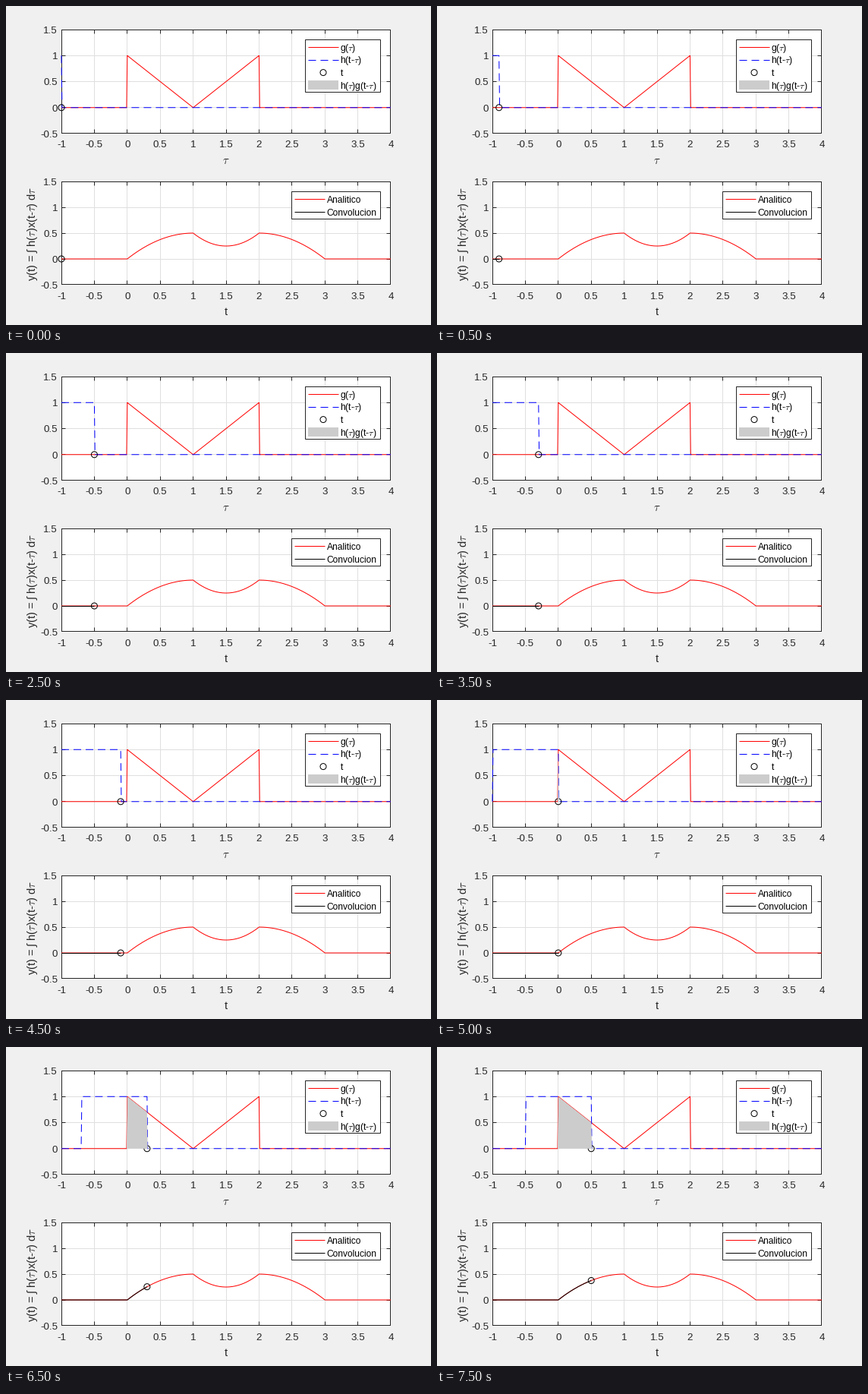
A matplotlib script for the animation above (8000 ms loop, 560x420 px).

```python
import numpy as np
import matplotlib.pyplot as plt
from matplotlib.animation import FuncAnimation
from matplotlib.patches import Circle, Rectangle

W, H = 560, 420
FRAMES, INTERVAL = 16, 500
INK, GRID, SHADE = "#262626", "#dfdfdf", "#cccccc"

# At 72 dpi one point equals one pixel.
plt.rcParams.update({
    "font.family": "Liberation Sans",
    "mathtext.fontset": "cm",
    "lines.linewidth": 1,
    "lines.solid_capstyle": "butt",
    "path.simplify": False,
    "toolbar": "None",
})

fig = plt.figure(figsize=(W / 72, H / 72), dpi=72, facecolor="#f0f0f0")
page = fig.add_axes([0, 0, 1, 1])
page.set(xlim=(0, W), ylim=(H, 0))
page.axis("off")

RED, BLACK = dict(color="red"), dict(color="black")
DASH = dict(color="blue", dashes=(10, 6), dash_capstyle="butt")


def step(x):
    return (x > -1e-9).astype(float)


def g(x):
    return np.abs(1 - x) * (step(x) - step(x - 2.005))


def h(x):
    return step(x) - step(x - 1)


def response(t):
    return np.select(
        [t <= 0, t <= 1, t <= 2, t <= 3],
        [0 * t, t - t**2 / 2, ((2 - t)**2 + (t - 1)**2) / 2, 0.5 - (t - 2)**2 / 2],
        0)


def label(x, y, text, size, color=INK, **kw):
    page.text(x, y, text, size=size, color=color, **kw)


def ring(x, y, z=4):
    return page.add_patch(Circle((x, y), 4, fc="none", ec="black", lw=1, zorder=z))


class Plot:
    """Plot area spanning -1..4 by -0.5..1.5 inside a pixel box."""

    left, right = 73, 507

    def __init__(self, top, bottom):
        self.top, self.bottom = top, bottom
        self.frame()

    def xy(self, x, y):
        return (self.left + (x + 1) / 5 * (self.right - self.left),
                self.bottom - (y + 0.5) / 2 * (self.bottom - self.top))

    def frame(self):
        l, r, t, b = self.left, self.right - 1, self.top, self.bottom - 1
        box = (l, t), r - l, b - t
        page.add_patch(Rectangle(*box, fc="white", ec="none", zorder=0))
        page.add_patch(Rectangle(*box, fc="none", ec=INK, lw=1, zorder=1.5))
        for v in np.arange(-1, 4.1, 0.5):
            x = self.xy(v, 0)[0]
            self.rule([min(int(x + 1e-6), r)] * 2, [t, b], (0, 5))
            label(x, b + 19.5, f"{v:g}", 13.33, ha="center")
        for v in np.arange(-0.5, 1.6, 0.5):
            y = self.xy(0, v)[1]
            self.rule([l, r], [min(int(y + 1e-6), b)] * 2, (5, 0))
            label(l - 5, y + 5, f"{v:g}", 13.33, ha="right")

    def rule(self, xs, ys, tick):
        """Grid line with a tick at each end."""
        page.plot(xs, ys, color=GRID, zorder=1)
        for end, sign in ((0, 1), (1, -1)):
            x, y = xs[end], ys[end]
            page.plot([x, x + sign * tick[0]], [y, y + sign * tick[1]],
                      color=INK, zorder=1.4)

    def line(self, x, y, z, **style):
        return page.plot(*self.xy(x, y), zorder=z, **style)[0]


def legend(x, y, w, height, rows):
    page.add_patch(Rectangle((x, y), w, height, fc="white", ec=INK, lw=1, zorder=6))
    for i, (text, style) in enumerate(rows):
        row = y + 10.4 + 16.6 * i
        if style == "ring":
            ring(x + 24, row, 7)
        elif style == "area":
            page.add_patch(Rectangle((x + 4, row - 6), 40, 12,
                                     fc=SHADE, ec="none", zorder=7))
        else:
            page.plot([x + 4, x + 44], [row, row], zorder=7, **style)
        label(x + 46.5, row + 4.5, text, 12, "black", zorder=7)


tau = np.arange(-100, 401) / 100
top, low = Plot(31, 168), Plot(231, 367)

legend(394, 44, 99, 69, [
    (r"g($\tau$)", RED),
    (r"h(t-$\tau$)", DASH),
    ("t", "ring"),
    (r"h($\tau$)g(t-$\tau$)", "area"),
])
legend(376, 244, 117, 36, [("Analitico", RED), ("Convolucion", BLACK)])

label(290, 208, r"$\tau$", 14.67, ha="center")
label(290, 407, "t", 14.67, ha="center")
label(39, 299.5, r"y(t) = ∫ h($\tau$)x(t-$\tau$) d$\tau$", 14.67,
      rotation=90, rotation_mode="anchor", ha="center")

top.line(tau, g(tau), 2, **RED)
window = top.line(tau, 0 * tau, 3, **DASH)
ring_top = ring(*top.xy(-1, 0))
area, = page.fill([0, 0, 0], [0, 0, 0], fc=SHADE, ec="none", zorder=5)

low.line(tau, response(tau), 2, **RED)
trace = low.line(tau, 0 * tau, 3, **BLACK)
ring_low = ring(*low.xy(-1, 0))


def update(i):
    t = -1 + i / 10
    past = -1 + np.arange(i + 1) / 10
    y = response(past)
    gate = h(t - tau)
    window.set_data(*top.xy(tau, gate))
    area.set_xy(np.column_stack(top.xy(tau, gate * g(tau))))
    ring_top.center = top.xy(t, 0)
    trace.set_data(*low.xy(past, y))
    ring_low.center = low.xy(t, y[-1])
    return window, area, ring_top, trace, ring_low


anim = FuncAnimation(fig, update, frames=FRAMES, interval=INTERVAL,
                     repeat=True, repeat_delay=0, blit=False)
plt.show()
```
